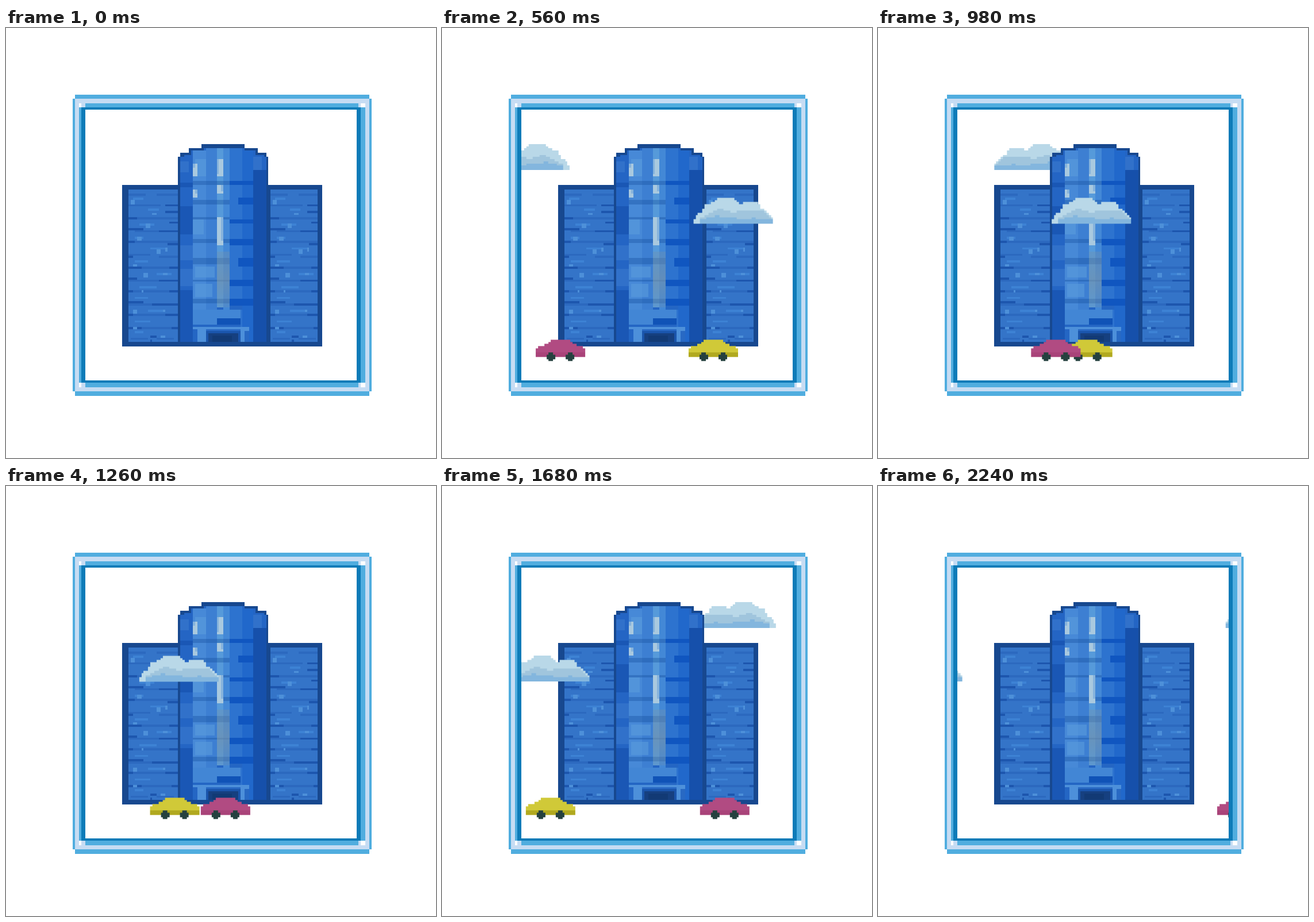
An HTML page without scripts for the animation above (2.31 s loop, 748x748 px).

```html
<!DOCTYPE html>
<html lang="en">
<head>
<meta charset="utf-8">
<title>Office block</title>
<style>
html, body { margin: 0; width: 100%; height: 100%; overflow: hidden; background: #fff; }
svg { display: block; width: 100vw; height: 100vh; }
.thin { fill: none; stroke-width: 1; }
.go { animation: 2310ms step-end infinite; }
.near { animation-name: near; }
.far { animation-name: far; }
.yellow { animation-name: yellow; }
.pink { animation-name: pink; }

/* one picture every 140 ms; steps(n) fills the pictures between two stops */
@keyframes near {
  0% { transform: translateX(164px); }
  6.06% { transform: translateX(157px); }
  12.12% { transform: translateX(143.6px); animation-timing-function: steps(2); }
  24.24% { transform: translateX(117px); }
  30.3% { transform: translateX(104px); }
  36.36% { transform: translateX(87px); }
  42.42% { transform: translateX(80.8px); animation-timing-function: steps(2); }
  54.54% { transform: translateX(62px); }
  60.6% { transform: translateX(50px); }
  66.66% { transform: translateX(40.7px); }
  72.72% { transform: translateX(31.7px); animation-timing-function: steps(4); }
  96.96%, 100% { transform: translateX(2.3px); }
}
@keyframes far {
  0% { transform: translateX(-2px); }
  6.06% { transform: translateX(5px); }
  12.12% { transform: translateX(7px); animation-timing-function: steps(2); }
  24.24% { transform: translateX(22.3px); animation-timing-function: steps(2); }
  36.36% { transform: translateX(41px); }
  42.42% { transform: translateX(54px); animation-timing-function: steps(3); }
  60.6% { transform: translateX(97.7px); }
  66.66% { transform: translateX(107.4px); }
  72.72% { transform: translateX(118.3px); animation-timing-function: steps(4); }
  96.96%, 100% { transform: translateX(161.6px); }
}
@keyframes yellow {
  0% { transform: translateX(164px); }
  6.06% { transform: translateX(157px); }
  12.12% { transform: translateX(144.4px); animation-timing-function: steps(2); }
  24.24% { transform: translateX(114.7px); animation-timing-function: steps(3); }
  42.42% { transform: translateX(86px); animation-timing-function: steps(3); }
  60.6% { transform: translateX(57.5px); animation-timing-function: steps(2); }
  72.72% { transform: translateX(39px); animation-timing-function: steps(4); }
  96.96%, 100% { transform: translateX(2px); }
}
@keyframes pink {
  0% { transform: translateX(10px); }
  6.06% { transform: translateX(14.5px); }
  12.12% { transform: translateX(24px); animation-timing-function: steps(2); }
  24.24% { transform: translateX(43.6px); animation-timing-function: steps(3); }
  42.42% { transform: translateX(71.2px); animation-timing-function: steps(3); }
  60.6% { transform: translateX(100.3px); animation-timing-function: steps(2); }
  72.72% { transform: translateX(120px); animation-timing-function: steps(4); }
  96.96%, 100% { transform: translateX(157.8px); }
}
</style>
</head>
<body>
<svg viewBox="0 0 200 200" shape-rendering="crispEdges">
  <defs>
    <clipPath id="pane"><path d="M37 38H163V164H37z"/></clipPath>

    <g id="cloud">
      <path fill="#b9d8e8" d="M0 91V89H1V87H2V86H4V84H5V82H8V81H10V80H11V79H19V80H20V81H21V82H23V81H30V82H31V84H33V85H34V86H35V87H36V88H37V91z"/>
      <path fill="#a0c5dd" d="M3 89V88H5V87H7V86H9V85H11V84H14V85H17V86H20V85H33V86H34V87H35V88H36V90H3z"/>
      <path fill="#83b6de" d="M3 91V89H6V88H10V87H12V88H20V89H27V88H29V89H37V91z"/>
    </g>

    <path id="body" d="M0 153V149H1V148H4V147H6V146H7V145H16V146H17V147H19V148H22V149H23V153z"/>
    <path id="wheel" fill="#25413f" d="M5 152H6V151H8V152H9V154H8V155H6V154H5z"/>
    <g id="wheels"><use href="#wheel"/><use href="#wheel" x="9"/></g>

    <!-- shared by both wings -->
    <g id="wing">
      <path fill="#3474c8" d="M57 75H80V146H57z"/>
      <path class="thin" stroke="#2c69bf" d="M57 77.5H65M70 77.5H80M57 82.5H72M61 88.5H80M60 94.5H74M57 99.5H80M57 105.5H67M71 106.5H80M57 111.5H80M57 117.5H80M57 122.5H80M57 128.5H80M57 133.5H80M57 139.5H80M58 144.5H66M70 144.5H78"/>
      <path class="thin" stroke="#1d56ae" d="M74 82.5H80M74 85.5H80M57 88.5H61M76 90.5H80M57 93.5H64M71 94.5H80M57 99.5H60M75 100.5H80M57 106.5H59M57 111.5H63M76 111.5H80M57 116.5H61M71 117.5H80M57 122.5H59M76 122.5H80M57 127.5H64M68 128.5H80M57 133.5H59M74 133.5H80M57 139.5H63M77 139.5H80M67 143.5H70M67 145.5H68"/>
      <path class="thin" stroke="#3d82d4" d="M59 79.5H64M66 84.5H71M62 91.5H69M60 97.5H64M67 102.5H75M60 108.5H66M70 114.5H77M62 120.5H70M60 125.5H66M66 131.5H74M60 136.5H67M60 141.5H64"/>
      <path fill="#4d90d9" d="M58 80h2v2h-2zM68 86h2v1h-2zM65 91h2v2h-2zM61 97h2v2h-2zM70 103h2v2h-2zM74 102h1v2h-1zM59 110h2v1h-2zM64 114h2v2h-2zM73 114h2v1h-2zM63 122h1v1h-1zM59 131h2v2h-2zM73 131h1v1h-1zM59 139h2v1h-2zM72 143h2v1h-2z"/>
    </g>

    <linearGradient id="haze" x2="0" y2="1">
      <stop stop-color="#7190ac" stop-opacity=".35"/>
      <stop offset=".5" stop-color="#7190ac" stop-opacity=".65"/>
      <stop offset="1" stop-color="#7190ac" stop-opacity=".25"/>
    </linearGradient>
  </defs>

  <g id="border">
    <path fill="#50addf" d="M32 31H169V33H170V169H169V171H32V169H31V33H32z"/>
    <path fill="#c6dcf3" d="M32 33H169V169H32z"/>
    <path fill="#50addf" d="M34 35H167V167H34z"/>
    <path fill="#0d7bb8" d="M35 37H165V165H35z"/>
    <path fill="#fff" d="M37 38H163V164H37zM34 35h1v2h-1zM165 35h2v2h-2zM34 165h1v2h-1zM165 165h2v2h-2z"/>
    <path fill="#c6dcf3" d="M35 35h2v2h-2zM164 35h1v2h-1zM35 165h2v2h-2zM164 165h1v2h-1z"/>
  </g>

  <g clip-path="url(#pane)">
    <g class="go far"><use href="#cloud" transform="translate(37 -25) scale(-1 1)"/></g>

    <g id="block">
      <path fill="#17488f" d="M54 73H147V148H54z"/>
      <use href="#wing"/>
      <use href="#wing" x="66"/>
      <path fill="#17488f" d="M145 73H147V148H145zM80 148V60H81V58H85V56H91V54H111V56H117V58H121V60H122V148z"/>

      <path fill="#2465c4" d="M81 146V60H83V59H86V57H92V56H111V57H116V59H120V60H121V146z"/>
      <path fill="#4789d7" d="M87 57H93V140H87z"/>
      <path fill="#3d7fd2" d="M93 56H98V140H93z"/>
      <path fill="#569ada" d="M98 56H101V130H98z"/>
      <path fill="#4388d6" d="M101 56H104V134H101z"/>
      <path fill="#2d73cf" d="M104 56H110V140H104z"/>
      <path fill="#2168cb" d="M110 57H115V146H110z"/>
      <path fill="#1650ab" d="M115 66H121V146H115z"/>
      <path fill="#3171ca" d="M81 62h4v5h-4zM81 101h6v7h-6zM81 112h6v8h-6zM115 60h4v6h-4z"/>
      <path fill="#1a57b5" d="M81 72h6v2h-6zM81 83h6v13h-6zM81 122h6v24h-6z"/>

      <!-- floor edges -->
      <path fill="#174f9e" opacity=".38" d="M87 71H104V73H87zM87 80H104V82H87zM87 88H104V89H87zM87 98H104V100H87zM87 107H104V110H87zM87 117H104V118H87zM87 126H104V128H87z"/>
      <path fill="#1056c0" d="M104 71H115V73H104zM108 79H115V82H108zM104 89H115V91H104zM104 98H115V101H104zM108 107H115V111H108zM104 117H115V120H104zM104 126H115V129H104z"/>
      <path fill="#5a9bdc" opacity=".6" d="M88 61H93V69H88zM87 89H92V96H87zM88 111H97V116H88zM88 119H96V125H88z"/>
      <path fill="url(#haze)" d="M98 104H104V130H98z"/>

      <path fill="#a9c9df" d="M98 61h3v8h-3zM87 63h2v6h-2zM87 75h2v4h-2zM98 73h3v4h-3zM98 88h3v13h-3z"/>
      <path fill="#86b3dc" d="M87 63h1v2h-1zM98 61h1v7h-1zM100 73h1v3h-1zM88 75h1v2h-1zM100 88h1v11h-1z"/>

      <!-- entrance -->
      <path fill="#4286d5" d="M87 131H109V140H87z"/>
      <path fill="#1053b7" d="M98 135H109V138H98z"/>
      <path fill="#2466c4" d="M87 138H109V139H87zM87 141H89V146H87zM104 129H110V131H104z"/>
      <path fill="#4d90da" d="M87 139H109V140H87zM89 140H93V146H89zM109 139H113V146H109z"/>
      <path fill="#2869c4" d="M93 140H109V141H93zM111 141H113V146H111z"/>
      <path fill="#1a55ac" d="M93 141H109V146H93z"/>
      <path fill="#164080" d="M94 142H108V146H94z"/>
      <path fill="#123a75" d="M96 143H105V146H96z"/>
      <path fill="#17488f" d="M54 146H147V148H54z"/>
    </g>

    <g class="go near"><use href="#cloud"/></g>
    <g class="go yellow">
      <use href="#body" fill="#d0c938"/>
      <path fill="#b1a91f" d="M0 151H23V153H0z"/>
      <use href="#wheels"/>
    </g>
    <g class="go pink">
      <use href="#body" fill="#b14b82"/>
      <path fill="#a94379" d="M0 151H23V153H0z"/>
      <use href="#wheels"/>
    </g>
  </g>
</svg>
</body>
</html>
```
